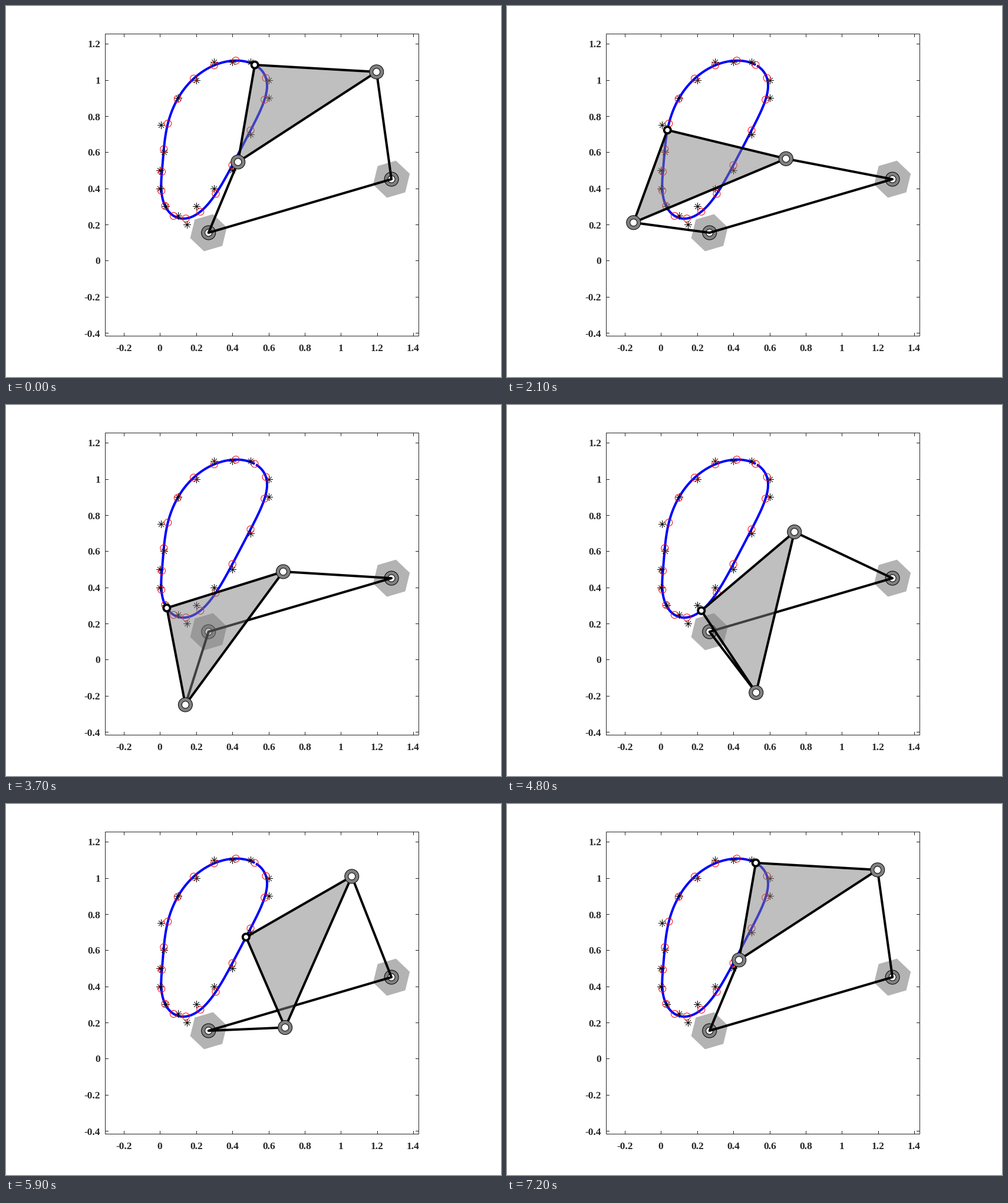
These frames come from a looping animation (840 by 630 pixels, 7300 ms). A matplotlib script:

```python
import numpy as np
import matplotlib.pyplot as plt
from matplotlib.animation import FuncAnimation
from matplotlib.patches import Circle, Polygon, Rectangle

plt.rcParams["path.snap"] = False

W, H, DPI = 840, 630, 100
PX = 72 / DPI                      # one pixel in points
SCALE, X0, Y0 = 306.8, 261.95, 432.8
INK = "#262626"
STEPS = 72

# Four-bar linkage in pixels, as complex numbers with y upwards
A = 343.7 - 385j
D = 654.1 - 294.1j
CRANK, COUPLER, ROCKER = 130.1, 280.5, 184.0
ARM = 167.3 * np.exp(1j * np.radians(47.15))
START = 67.4


def pose(turn):
    """Crank pin, rocker pin and tracing point after a turn in degrees."""
    b = A + CRANK * np.exp(1j * np.radians(START + turn))
    gap = D - b
    dist = np.abs(gap)
    cos_b = (COUPLER**2 + dist**2 - ROCKER**2) / (2 * COUPLER * dist)
    unit = gap / dist * np.exp(1j * np.arccos(cos_b))
    return b, b + COUPLER * unit, b + ARM * unit


def xy(z):
    z = np.atleast_1d(z)
    return z.real, -z.imag


def pixel(x, y):
    """Centre of the pixel that holds a data point."""
    return (np.floor(X0 + SCALE * np.asarray(x)) + 0.5,
            np.floor(Y0 - SCALE * np.asarray(y)) + 0.5)


fig = plt.figure(figsize=(W / DPI, H / DPI), dpi=DPI, facecolor="white")
ax = fig.add_axes([0, 0, 1, 1])
ax.set_xlim(0, W)
ax.set_ylim(H, 0)
ax.axis("off")


def line(x, y, color="black", width=4, z_order=1):
    return ax.plot(x, y, color=color, lw=width * PX, zorder=z_order,
                   solid_capstyle="butt", solid_joinstyle="round")[0]


def ring(z, radius, z_order, face="none", edge="black", width=1):
    return ax.add_patch(Circle((z.real, -z.imag), radius, fc=face, ec=edge,
                               lw=width * PX, zorder=z_order))


def bearing(z, z_order):
    return (ring(z, 12, z_order, "#808080"),
            ring(z, 6, z_order + 0.1, "white"))


def star(x, y):
    for dx, dy in ((6.5, 0), (0, 6.5), (4.3, 4.3), (4.3, -4.3)):
        line([x - dx, x + dx], [y - dy, y + dy], width=1, z_order=2)


def draw_frame():
    left, right, top, bottom = 168.5, 700.5, 47.5, 560.5
    tick = 5.5
    ax.add_patch(Rectangle((left, top), right - left, bottom - top,
                           fill=False, ec=INK, lw=PX, zorder=0))
    style = dict(color=INK, width=1, z_order=0)
    font = dict(family="Liberation Serif", weight="bold", color=INK,
                size=17.33 * PX, va="baseline")
    for k in range(-2, 8):
        v = round(0.2 * k, 1)
        x, y = pixel(v, v)
        if k >= -1:
            line([x, x], [bottom, bottom - tick], **style)
            line([x, x], [top, top + tick], **style)
            ax.text(x - 0.6, 586, f"{v:g}", ha="center", **font)
        if k <= 6:
            line([left, left + tick], [y, y], **style)
            line([right, right - tick], [y, y], **style)
            ax.text(160, y + 6, f"{v:g}", ha="right", **font)


def draw_path():
    line(*xy(pose(np.linspace(0, 358.5, 400))[2]), "blue")
    goal_x = [0.15, 0.1, 0.03, 0, 0, 0.02, 0.005, 0.1, 0.2,
              0.3, 0.4, 0.5, 0.6, 0.6, 0.5, 0.4, 0.3, 0.2]
    goal_y = [0.2, 0.25, 0.3, 0.4, 0.5, 0.6, 0.75, 0.9, 1,
              1.1, 1.1, 1.1, 1, 0.9, 0.7, 0.5, 0.4, 0.3]
    for x, y in zip(*pixel(goal_x, goal_y)):
        star(x, y)
    for p in pose(np.arange(0, 360, 20))[2]:
        ring(p, 6, 3, edge="red")


def draw_ground():
    corners = 32.4 * np.exp(1j * (np.angle(D - A) + np.arange(6) * np.pi / 3))
    for pivot in (A, D):
        ax.add_patch(Polygon(np.column_stack(xy(pivot + corners)),
                             fc="#b3b3b3", ec="none", zorder=4))
        bearing(pivot, 5)


draw_frame()
draw_path()
draw_ground()

b0, c0, p0 = pose(0)
links = line(*xy([b0, A, D, c0]), z_order=6)
plate = Polygon(np.column_stack(xy([b0, c0, p0])), fc=(0.5, 0.5, 0.5, 0.5),
                ec="black", lw=4 * PX, joinstyle="round", zorder=7)
ax.add_patch(plate)
crank_pin = bearing(b0, 8)
rocker_pin = bearing(c0, 8)
tracer = (ring(p0, 5.6, 9, "white", width=3.8),)


def update(i):
    b, c, p = pose(360 * i / STEPS)
    links.set_data(*xy([b, A, D, c]))
    plate.set_xy(np.column_stack(xy([b, c, p])))
    for rings, z in ((crank_pin, b), (rocker_pin, c), (tracer, p)):
        for part in rings:
            part.center = z.real, -z.imag
    return links, plate, *crank_pin, *rocker_pin, *tracer


anim = FuncAnimation(fig, update, frames=STEPS + 1, interval=100,
                     repeat=True, repeat_delay=0, blit=False)
plt.show()
```
